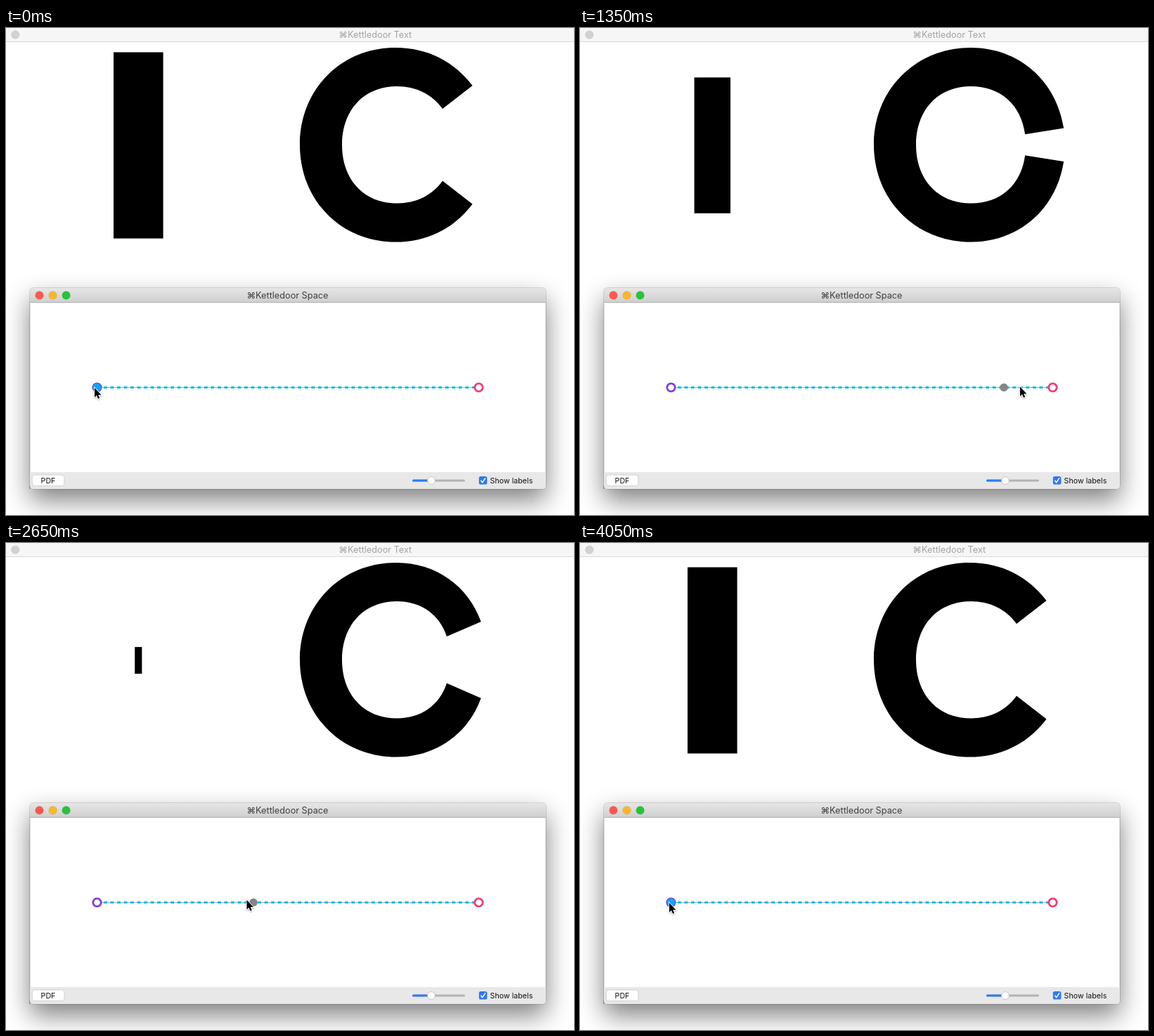
Animation, 808 px wide and 693 px high, one loop 4.1 s. Source, as an HTML page:

```html
<!DOCTYPE html>
<html lang="en">
<head>
<meta charset="utf-8">
<title>Variable letter preview</title>
<style>
  html, body { margin: 0; width: 100%; height: 100%; overflow: hidden; background: #fff; }
  svg { display: block; width: 808px; height: 693px; }
  text { font-family: Inter, Roboto, sans-serif; }
  .title { font-size: 12.7px; text-anchor: middle; }
  .label { font-size: 10.7px; fill: #111; }
</style>
</head>
<body>
<svg viewBox="0 0 808 693">
  <defs>
    <linearGradient id="bar" x2="0" y2="1">
      <stop offset="0" stop-color="#e6e6e6"/>
      <stop offset="1" stop-color="#cecece"/>
    </linearGradient>
    <filter id="blur" x="-20%" y="-40%" width="140%" height="180%">
      <feGaussianBlur stdDeviation="18"/>
    </filter>
    <filter id="soft" x="-60%" y="-60%" width="220%" height="220%">
      <feDropShadow dx="0" dy="1" stdDeviation="0.9" flood-opacity="0.4"/>
    </filter>
  </defs>

  <!-- back window -->
  <rect width="808" height="19.5" fill="#f6f6f6"/>
  <rect y="19" width="808" height="1" fill="#d9d9d9"/>
  <circle cx="13.3" cy="9.6" r="5.7" fill="#d1d1d1" stroke="#c4c4c4" stroke-width="0.6"/>
  <text class="title" x="525.3" y="14.3" fill="#a3a3a3">⌘Kettledoor Text</text>
  <rect id="stem"/>
  <path id="bowl"/>

  <!-- front window -->
  <rect x="34" y="386" width="734" height="286" rx="5" opacity="0.5" filter="url(#blur)"/>
  <path d="M34 656V375q0-5 5-5H763q5 0 5 5V651q0 5-5 5H39q-5 0-5-5Z" fill="#fff" stroke="#000" stroke-opacity="0.25"/>
  <path d="M34 391V375q0-5 5-5H763q5 0 5 5V391Z" fill="url(#bar)"/>
  <rect x="34" y="390" width="734" height="1" fill="#b1b1b1"/>
  <g stroke="#000" stroke-opacity="0.12" stroke-width="0.6">
    <circle cx="47.5" cy="380.4" r="5.8" fill="#ff5850"/>
    <circle cx="66.6" cy="380.4" r="5.8" fill="#fdb62b"/>
    <circle cx="85.6" cy="380.4" r="5.8" fill="#27c437"/>
  </g>
  <text class="title" x="400.4" y="385" fill="#404040">⌘Kettledoor Space</text>

  <!-- toolbar -->
  <path d="M34 632H768V651q0 5-5 5H39q-5 0-5-5Z" fill="#e8e8e8"/>
  <rect x="37.3" y="636" width="45.6" height="15.6" rx="3.6" fill="#fff" stroke="#cbcbcb" stroke-width="0.8"/>
  <text class="label" x="60" y="647.6" text-anchor="middle">PDF</text>
  <rect x="578" y="642.4" width="75" height="3" rx="1.5" fill="#b3b3b3"/>
  <rect x="578" y="642.4" width="27" height="3" rx="1.5" fill="#2c7cf7"/>
  <circle cx="605" cy="644" r="5.4" fill="#fff" stroke="#bdbdbd" stroke-width="0.8"/>
  <rect x="672.8" y="638" width="11.6" height="11.6" rx="2.6" fill="#2f79f3"/>
  <path d="M675.8 644.2l2 2.5 3.8-5.8" fill="none" stroke="#fff" stroke-width="1.5" stroke-linecap="round" stroke-linejoin="round"/>
  <text class="label" x="688.6" y="647.6">Show labels</text>

  <!-- axis -->
  <path d="M129.5 511.5H672.5" stroke="#8cb9c4" stroke-width="1"/>
  <path d="M129.5 511.5H672.5" stroke="#00bce8" stroke-width="3" stroke-dasharray="4.76 4.766"/>
  <g fill="#fff" stroke-width="2.8">
    <circle cx="129.5" cy="511.5" r="5.7" stroke="#7d3fe0"/>
    <circle cx="672.5" cy="511.5" r="5.7" stroke="#f23c74"/>
  </g>
  <circle id="dot" cy="511.5" r="5.8"/>
  <path id="cursor" d="M0 0V13.4L3 10.7L5 15.4L7.2 14.5L5.2 9.9H9.4Z" stroke="#fff" stroke-width="1.6"
        paint-order="stroke" filter="url(#soft)"/>
</svg>
<script>
const LOOP = 4100, STEP = 50;
const START = 129.5, END = 672.5, MID_Y = 166.3;
const $ = id => document.getElementById(id);
const setAttrs = (el, attrs) => {
  for (const key in attrs) el.setAttribute(key, attrs[key]);
};

// Smooth, overshoot-free curve through [time, value] keys
function track(keys) {
  const slope = i => (keys[i + 1][1] - keys[i][1]) / (keys[i + 1][0] - keys[i][0]);
  const tangent = i => {
    if (i === 0 || i === keys.length - 1) return 0;
    const a = slope(i - 1), b = slope(i);
    return a * b > 0 ? 2 * a * b / (a + b) : 0;
  };
  return t => {
    let i = 0;
    while (i < keys.length - 2 && t > keys[i + 1][0]) i++;
    const [t0, v0] = keys[i], [t1, v1] = keys[i + 1];
    const span = t1 - t0, u = Math.min(1, Math.max(0, (t - t0) / span));
    const w = u * u * (3 - 2 * u);
    return v0 + (v1 - v0) * w
      + span * u * (1 - u) * (tangent(i) * (1 - u) - tangent(i + 1) * u);
  };
}

// The dot trails the pointer, and the letters trail the dot.
const pointerX = track([[0, 126], [300, 165], [650, 346.5], [1100, 552], [1350, 626],
  [1650, 673], [1800, 678], [1950, 678], [2450, 474], [2650, 342.5], [3000, 214],
  [3150, 198], [3550, 144], [4000, 127], [4100, 127]]);
const pointerY = track([[0, 512], [650, 507], [1350, 510.5], [1800, 512], [1950, 512],
  [2650, 508], [3150, 507], [4000, 512], [4100, 512]]);
const dotX = track([[0, START], [300, 152], [650, 294.5], [1100, 535], [1350, 603],
  [1650, 667], [1800, END], [1950, END], [2450, 490], [2650, 352], [3000, 218],
  [3150, 202], [3550, 147.5], [4000, START], [4100, START]]);
const letterX = track([[0, START], [300, 142], [650, 257], [1100, 520], [1350, 599],
  [1650, 665], [1800, END], [1950, END], [2450, 504], [2650, 362], [3000, 222],
  [3150, 202], [3550, 148], [4000, START], [4100, START]]);

function bowlPath(p) {
  const mix = (a, b) => a + (b - a) * p;
  const top = mix(554, 556);
  // Upper half, from the outer terminal to the left and back to the inner terminal
  const outer = [
    [mix(663.5, 692), mix(82, 152)],
    [mix(638, 684), mix(48, 80)], [mix(600, 629), 28], [top, 28],
    [top - 78, 28], [418, 88], [418, MID_Y]];
  const inner = [
    [478, MID_Y], [478, 117], [509, 83], [556, 83],
    [mix(583, 601), 83], [mix(606, 631), mix(94, 112)],
    [mix(621, 635), mix(115, 157)]];
  const mirror = points => points.map(([x, y]) => [x, 2 * MID_Y - y]).reverse();
  const curve = points => "C" + points.slice(1).join(" ");
  return `M${outer[0]}${curve(outer)}${curve(mirror(outer))}`
    + `L${mirror(inner)[0]}${curve(mirror(inner))}${curve(inner)}Z`;
}

function render(time) {
  const t = Math.floor((time % LOOP) / STEP) * STEP;
  const p = (letterX(t) - START) / (END - START);
  const scale = Math.abs(1 - 2 * p), w = 70.6 * scale, h = 265 * scale;
  setAttrs($("stem"), { x: 188.3 - w / 2, y: 167 - h / 2, width: w, height: h });
  setAttrs($("bowl"), { d: bowlPath(p) });

  const x = dotX(t);
  const fill = x < START + 1 ? "#0aa8fa" : x > END - 1 ? "#00bdee" : "#868686";
  setAttrs($("dot"), { cx: x, fill });
  setAttrs($("cursor"), { transform: `translate(${pointerX(t)} ${pointerY(t)})` });
}

const begin = performance.now();
function tick() {
  render(performance.now() - begin);
  requestAnimationFrame(tick);
}
tick();
</script>
</body>
</html>
```
